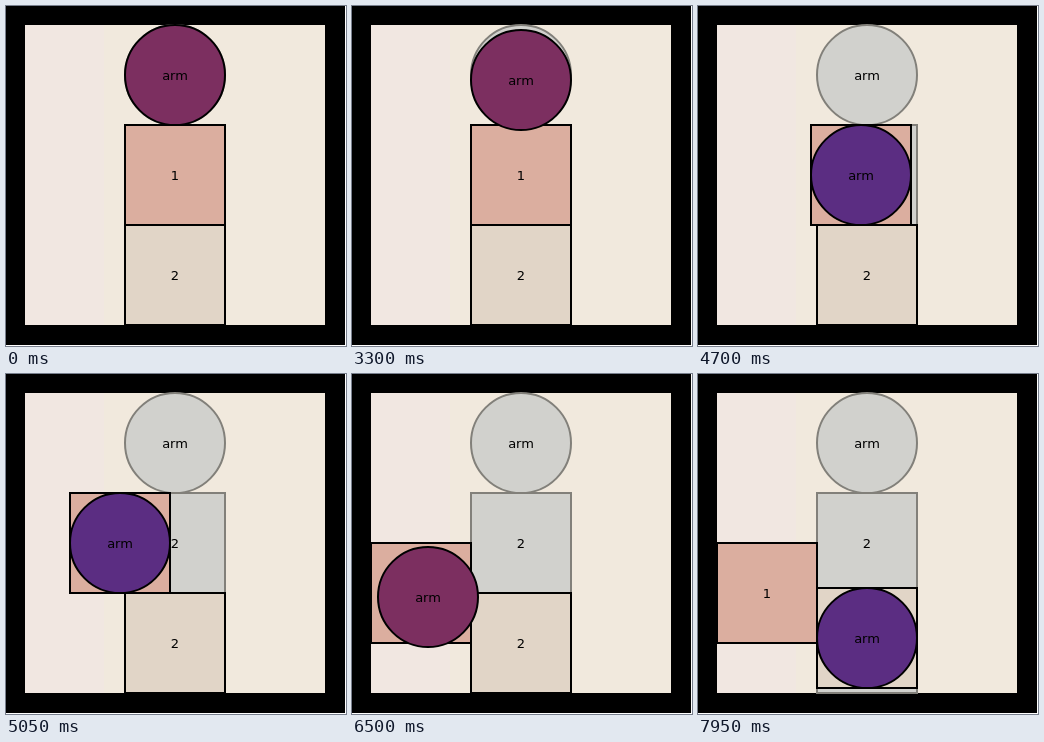
An HTML page with a canvas that plays this animation: 340x340 px, repeating every 8000 ms.

```html
<!DOCTYPE html>
<html>
<head>
<meta charset="utf-8">
<style>
  html, body { margin: 0; width: 100%; height: 100%; overflow: hidden; background: #fff; }
  canvas { display: block; }
</style>
</head>
<body>
<canvas id="stage" width="340" height="340"></canvas>
<script>
const ctx = document.getElementById('stage').getContext('2d');
const LOOP = 8000, STEP = 50, SPEED = 0.141, HALF = 50;
const GHOST = { fill: '#d1d1cd', line: '#82807a' };
const BLOCK_1 = { fill: '#dbae9f', line: '#000' };
const BLOCK_2 = { fill: '#e1d5c7', line: '#000' };
const ARM_FREE = { fill: '#7c2f60', line: '#000' };
const ARM_HOLDING = { fill: '#5b2d82', line: '#000' };

const TOP = [169, 69], MIDDLE = [169, 169], BOTTOM = [169, 269];
const SIDE = [69, 219];

// Each move runs at constant speed along its points.
const moves = [
  { start: 3265, path: [TOP, MIDDLE] },
  { start: 4659, path: [MIDDLE, [69, 169], SIDE], carries: 1 },
  { start: 6443, path: [SIDE, BOTTOM] },
  { start: 7914, path: [BOTTOM, MIDDLE], carries: 2 }
];

const distance = (a, b) => Math.hypot(b[0] - a[0], b[1] - a[1]);

function along(path, travelled) {
  for (let i = 1; i < path.length; i++) {
    const a = path[i - 1], b = path[i], len = distance(a, b);
    if (travelled < len) {
      const k = Math.max(0, travelled) / len;
      return [Math.round(a[0] + (b[0] - a[0]) * k), Math.round(a[1] + (b[1] - a[1]) * k)];
    }
    travelled -= len;
  }
  return path[path.length - 1];
}

function lengthOf(path) {
  return path.slice(1).reduce((sum, p, i) => sum + distance(path[i], p), 0);
}

function stateAt(t) {
  const state = { arm: TOP, 1: MIDDLE, 2: BOTTOM, holding: false };
  for (const { start, path, carries } of moves) {
    if (t < start) break;
    state.arm = along(path, (t - start) * SPEED);
    if (carries) state[carries] = state.arm;
    const arrived = t >= start + lengthOf(path) / SPEED;
    state.holding = arrived ? !carries : !!carries;
  }
  return state;
}

function paint(style, label, [x, y]) {
  ctx.fillStyle = style.fill;
  ctx.strokeStyle = style.line;
  ctx.lineWidth = 2;
  ctx.fill();
  ctx.stroke();
  ctx.fillStyle = '#000';
  ctx.fillText(label, x, y + 5);
}

function block(label, pos, style) {
  ctx.beginPath();
  ctx.rect(pos[0] - HALF, pos[1] - HALF, 2 * HALF, 2 * HALF);
  paint(style, label, pos);
}

function arm(pos, style) {
  ctx.beginPath();
  ctx.arc(pos[0], pos[1], HALF, 0, 2 * Math.PI);
  paint(style, 'arm', pos);
}

function room() {
  ctx.fillStyle = '#fff';
  ctx.fillRect(0, 0, 340, 340);
  ctx.fillStyle = '#000';
  ctx.fillRect(0, 0, 339, 339);
  ctx.fillStyle = '#f1e9dd';
  ctx.fillRect(19, 19, 300, 300);
  ctx.fillStyle = '#f1e7e1';
  ctx.fillRect(19, 19, 79, 300);
}

function draw(t) {
  const state = stateAt(t);
  ctx.font = '13px "DejaVu Sans", sans-serif';
  ctx.textAlign = 'center';
  room();
  block('1', BOTTOM, GHOST);
  block('2', MIDDLE, GHOST);
  arm(TOP, GHOST);
  block('2', state[2], BLOCK_2);
  block('1', state[1], BLOCK_1);
  arm(state.arm, state.holding ? ARM_HOLDING : ARM_FREE);
}

const begin = performance.now();
function tick() {
  const t = (performance.now() - begin) % LOOP;
  draw(Math.floor(t / STEP) * STEP);
  requestAnimationFrame(tick);
}
tick();
</script>
</body>
</html>
```
